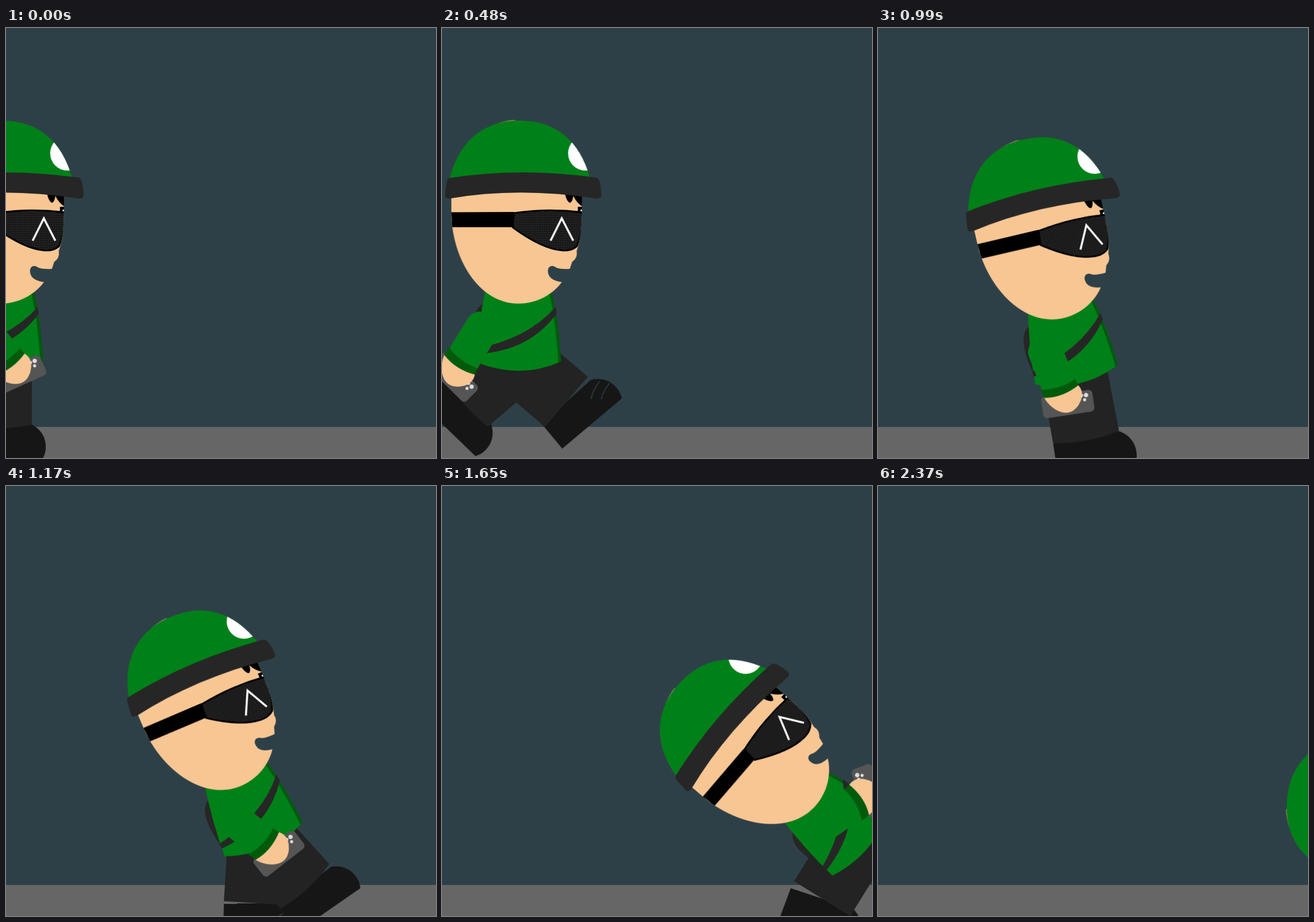
Write an HTML page without scripts that moves like this. It is 748 px wide and 748 px high and loops after 2400 ms.

```html
<!DOCTYPE html>
<html lang="en">
<head>
<meta charset="utf-8">
<title>Walking gamer</title>
<style>
  html, body { margin: 0; width: 100%; height: 100%; overflow: hidden; background: #2e4047; }
  svg { display: block; width: 100vw; height: 100vh; }

  .walk, .tip, .swing { animation: 2.4s linear infinite; }
  .walk { animation-name: walk; }
  .tip { animation-name: tip; transform-origin: 248px 447px; }
  .swing { animation-name: swing; }

  .leg { transform-origin: 129.5px 576px; --start: 0deg; }
  .foot { transform-origin: 129.5px 690px; --start: 0deg; }
  .arm { transform-origin: 89px 499px; --start: -69deg; --mid: 8.6deg; --end: -108deg; }
  .far.leg { --mid: -55.4deg; --end: 84.5deg; }
  .far .foot { --mid: 8.5deg; --end: -14deg; }
  .near.leg { --mid: 56deg; --end: -73deg; }
  .near .foot { --mid: -8.5deg; --end: 16deg; }

  /* steady walk, then the whole figure tips over backwards while speeding up */
  @keyframes walk {
    0% { transform: translateX(-142.5px); }
    31.4% { transform: translateX(81.2px); }
    100% { transform: translateX(763.3px); }
  }
  @keyframes tip {
    0%, 31.4% { transform: rotate(0deg); }
    100% { transform: rotate(-90.4deg); }
  }
  @keyframes swing {
    0%, 100% { transform: rotate(var(--start)); }
    22.5% { transform: rotate(var(--mid)); }
    67.5% { transform: rotate(var(--end)); }
  }

  .green { fill: #008018; }
  .shade { fill: #005a0c; }
  .skin { fill: #f7c693; }
  .cloth { fill: #232323; }
  .boot { fill: #161616; }
  .strap { fill: #262626; }
</style>
</head>
<body>
<svg viewBox="0 0 748 748">
  <defs>
    <path id="boot" class="boot" d="M72 690H187C215 705 215 735 205 750L70 746Z"/>
    <path id="dome" d="M13 262C28 200 70 161 133 161C198 161 238 195 257 260L133 275Z"/>
    <clipPath id="domeClip"><use href="#dome"/></clipPath>
    <clipPath id="faceClip"><path d="M0 270H243V320Q243 355 236 381L230 400H0Z"/></clipPath>
    <pattern id="mesh" width="4" height="4" patternUnits="userSpaceOnUse">
      <rect width="4" height="4" fill="#1f1f1f"/>
      <circle cx="2" cy="2" r="1.1" fill="#111"/>
    </pattern>
  </defs>

  <rect width="748" height="748" fill="#2e4047"/>
  <rect y="694" width="748" height="54" fill="#666"/>

  <g class="walk"><g class="tip">
    <path class="strap" d="M70 480Q46 495 59 557H85Z"/>

    <g class="far leg swing">
      <g class="foot swing">
        <use href="#boot"/>
        <path d="M196 702Q178 705 165 715M207 716Q191 718 178 727" fill="none" stroke="#2e4047" stroke-width="1.6"/>
      </g>
      <path class="cloth" d="M72 576H187V690H72Z"/>
    </g>
    <g class="near leg swing">
      <g class="foot swing"><use href="#boot"/></g>
      <path class="cloth" d="M72 576H187V690Q130 702 72 690Z"/>
    </g>

    <g>
      <path class="shade" d="M76 450H189Q203 510 207 580Q134 612 59 581Q62 520 76 450Z"/>
      <path class="green" d="M76 450H184Q198 510 202 582Q134 611 59 581Q62 520 76 450Z"/>
      <path class="strap" d="M197.500 485Q150 540 58 558L60 567Q150 563 199 497Z"/>
    </g>

    <g class="arm swing">
      <g transform="rotate(44.500 20 608)">
        <rect x="-25" y="589" width="90" height="38" rx="7" fill="#555"/>
      </g>
      <g fill="#ddd">
        <circle cx="51.500" cy="624" r="3.700"/>
        <circle cx="43.500" cy="627" r="2.700"/>
        <circle cx="46" cy="618" r="3"/>
      </g>
      <path class="skin" d="M4 569C-6 591 -1 624 26 624C45 624 55 615 57 603L40 570Z"/>
      <path class="shade" d="M11 556L4 569Q23 594 57 603L63 591L40 555Z"/>
      <path class="green" d="M64 493Q50 496 45 505L13 557Q31 581 62 592L88 549L112 508Z"/>
    </g>

    <g>
      <path class="skin" d="M16 270V320C16 398 62 479.500 133 479.500C165 479.500 193 463 208 442
        C192 440 184 433 184 423C184 414 191 412 197 416Q204 420 222 419L226 407
        Q236 400 234 388L237 378Q243 350 243 320V270Z"/>
      <path d="M213 286Q217 304 223 304Q227 301 228 292Q234 304 243 310V286Z"/>
      <g clip-path="url(#faceClip)">
        <rect x="236" y="311" width="10" height="12"/>
        <circle cx="243" cy="318" r="2.500" fill="#fff"/>
        <path d="M16 320.500L125 320V346.500H17.500Z"/>
        <path d="M125 322Q185 313 246 321Q244 360 234 380Q224 388 210 387Q175 385 123 347Q123 335 125 322Z"
          fill="url(#mesh)" stroke="#000" stroke-width="3"/>
        <path d="M188.500 370L208 331L228 370" fill="none" stroke="#fff" stroke-width="3.500"/>
      </g>
      <path d="M97 166.500Q112 161.500 127 160.800" fill="none" stroke="#a39262" stroke-width="1.500"/>
      <use href="#dome" class="green"/>
      <circle cx="249" cy="218" r="30" fill="#fff" clip-path="url(#domeClip)"/>
      <path class="strap" d="M13 261Q133 242 267 260Q276 260 277 291Q276 298 267 296.500Q133 276 14 296.500Q4 297 5 290L8 266Q9 262 13 261Z"/>
    </g>
  </g></g>
</svg>
</body>
</html>
```
